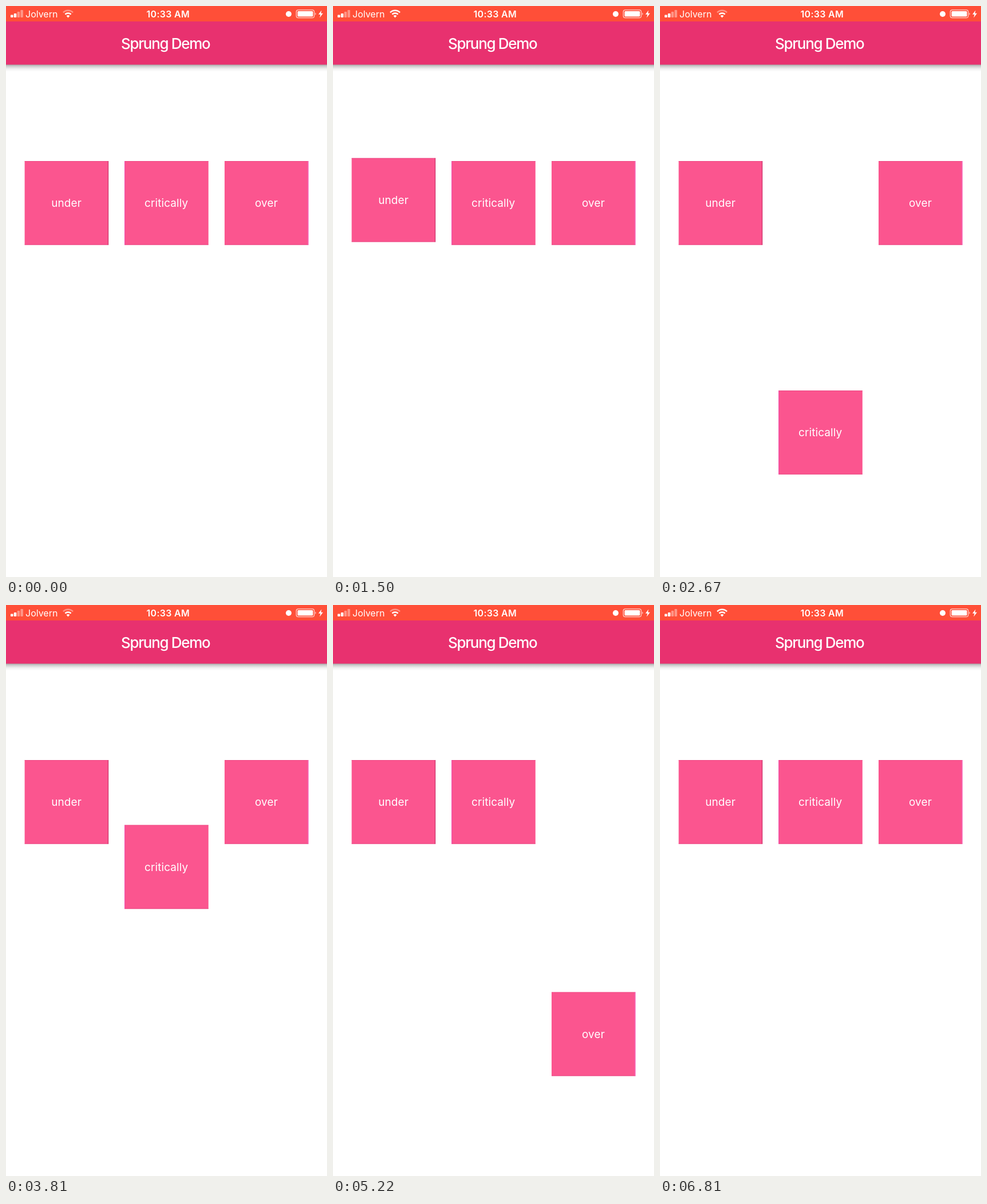
Write an HTML page that moves like this. It is 561 px wide and 998 px high and loops after 7.84 s.

```html
<!DOCTYPE html>
<html lang="en">
<head>
<meta charset="utf-8">
<title>Sprung Demo</title>
<style>
  html, body { margin: 0; width: 100%; height: 100%; overflow: hidden; background: #fff; }
  svg { display: block; width: 561px; height: 998px; }
  text { font-family: Inter, sans-serif; fill: #fff; }
  .title { font-size: 26px; font-weight: 500; letter-spacing: -1.35px; }
  .status { font-size: 16px; }
  .clock { font-weight: 600; letter-spacing: .3px; }
  .label { font-size: 19px; letter-spacing: .1px; text-anchor: middle; }
  .dim { opacity: .4; }
</style>
</head>
<body>
<svg viewBox="0 0 561 998">
  <defs>
    <linearGradient id="shade" x1="0" y1="0" x2="0" y2="1">
      <stop offset="0" stop-color="#000" stop-opacity=".36"/>
      <stop offset=".25" stop-color="#000" stop-opacity=".2"/>
      <stop offset=".6" stop-color="#000" stop-opacity=".06"/>
      <stop offset="1" stop-color="#000" stop-opacity="0"/>
    </linearGradient>
  </defs>

  <g id="boxes"></g>

  <rect y="102" width="561" height="13" fill="url(#shade)"/>
  <rect y="27" width="561" height="75.5" fill="#e8316f"/>
  <rect width="561" height="27" fill="#ff4f38"/>
  <text class="title" x="201" y="74.5">Sprung Demo</text>

  <g fill="#fff">
    <rect x="8" y="15.5" width="4.5" height="4.5" rx="1"/>
    <rect x="13.8" y="13" width="4.5" height="7" rx="1"/>
    <rect class="dim" x="19.6" y="10" width="4.5" height="10" rx="1"/>
    <rect class="dim" x="25.4" y="7" width="4.5" height="13" rx="1"/>
    <path d="M108.5 20.5L105.6 17.3A4.2 4.2 0 0 1 111.4 17.3Z"/>
    <circle cx="494" cy="14" r="5"/>
    <rect x="509.5" y="9" width="27" height="9.5" rx="1.5"/>
    <path d="M540.5 11.5a3 3 0 0 1 0 4.5Z"/>
    <path d="M551.5 7.5L546 14.8H549.6L548.2 20.5L554 12.8H550.4Z"/>
  </g>
  <g fill="none" stroke="#fff">
    <path d="M103.4 14.6A7.2 7.2 0 0 1 113.6 14.6" stroke-width="2.5"/>
    <path id="wave" d="M100 11.4A12 12 0 0 1 117 11.4" stroke-width="2.5"/>
    <rect x="507.3" y="6.8" width="31.4" height="13.9" rx="3.5" stroke-width="1.2" opacity=".75"/>
  </g>
  <text class="status" x="34" y="20">Jolvern</text>
  <text class="status clock" x="245.5" y="20">10:33 AM</text>
</svg>

<script>
const LOOP = 7840, STEP = 30, SPEED = 5 / 3;
const TOP = 271, SIZE = 146.5, DROP = 424, STIFFNESS = 180;

// moves: [start ms, target offset, lag ms]
const springs = [
  { name: 'under', x: 32.6, damping: 12, right: '#c52a62',
    moves: [[60, DROP, 0], [1230, 0, 30]] },
  { name: 'critically', x: 207.3, damping: 20, left: '#ee45b0',
    moves: [[2520, DROP, 21], [3690, 0, 44]] },
  { name: 'over', x: 382, damping: 28, right: '#f468c8',
    moves: [[4980, DROP, 7], [6180, 0, 15]] }
];

function add(parent, tag, attrs) {
  const el = document.createElementNS('http://www.w3.org/2000/svg', tag);
  for (const key in attrs) el.setAttribute(key, attrs[key]);
  return parent.appendChild(el);
}

// Position of a unit-mass spring travelling from 0 to 1.
function spring(damping, t) {
  const g = damping / 2, d = g * g - STIFFNESS, w = Math.sqrt(Math.abs(d));
  const swing = d < 0
    ? Math.cos(w * t) + g / w * Math.sin(w * t)
    : Math.cosh(w * t) + g / w * Math.sinh(w * t);
  return 1 - Math.exp(-g * t) * swing;
}

function offsetAt(box, time) {
  let y = 0;
  for (const [start, to, lag] of box.moves) {
    if (time < start) break;
    const passed = Math.floor((time - start) / STEP) * STEP;
    const t = Math.max(0, passed * SPEED - lag) / 1000;
    const from = DROP - to;
    y = t < 1 ? from + (to - from) * spring(box.damping, t) : to;
  }
  return y;
}

const layer = document.getElementById('boxes');
for (const box of springs) {
  box.el = add(layer, 'g', {});
  add(box.el, 'rect', { x: box.x, y: TOP, width: SIZE, height: SIZE, fill: '#fb558f' });
  const edge = (x, y, width, height, fill) =>
    add(box.el, 'rect', { x, y, width, height, fill });
  edge(box.x, TOP, SIZE, .7, '#e8437f');
  edge(box.x, TOP + SIZE - .9, SIZE, .9, '#e8437f');
  if (box.left) edge(box.x, TOP, .9, SIZE, box.left);
  if (box.right) edge(box.x + SIZE - 1, TOP, 1, SIZE, box.right);
  add(box.el, 'text', { class: 'label', x: box.x + SIZE / 2 - .3, y: TOP + 80 })
    .textContent = box.name;
}

const wave = document.getElementById('wave');
function draw() {
  const time = performance.now() % LOOP;
  for (const box of springs)
    box.el.setAttribute('transform', `translate(0 ${offsetAt(box, time).toFixed(2)})`);
  const strong = (time >= 1230 && time < 2520) || time >= 6180;
  wave.setAttribute('opacity', strong ? 1 : .4);
  requestAnimationFrame(draw);
}
draw();
</script>
</body>
</html>
```
